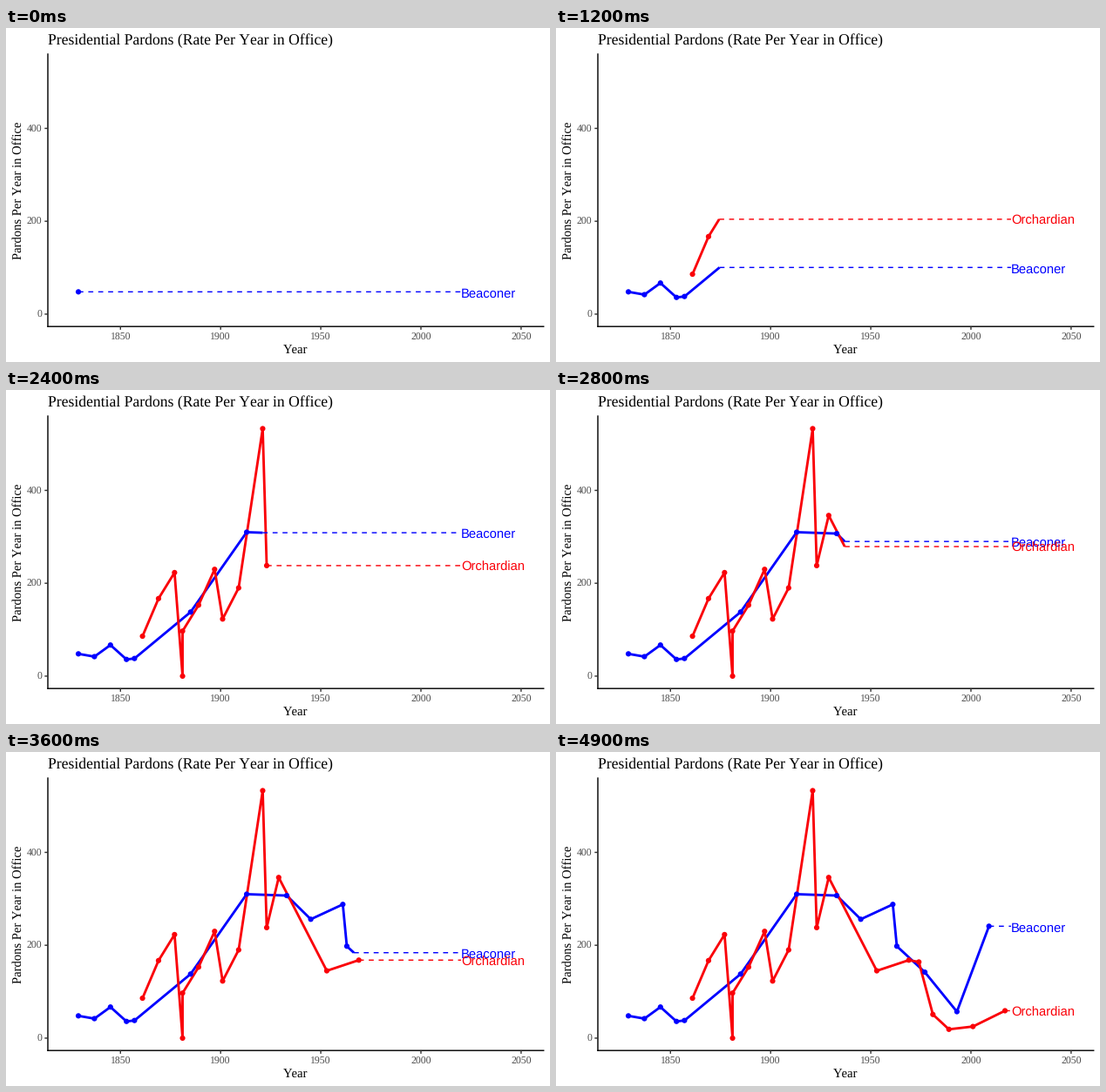
These frames come from a looping animation (624x384 px, 5000 ms). A matplotlib script:

```python
import matplotlib.pyplot as plt
import numpy as np
from matplotlib.animation import FuncAnimation
from matplotlib.lines import Line2D

W, H, DPI = 624, 384, 96
FRAMES, INTERVAL = 50, 100
PT = 72 / DPI  # points per pixel
MM = 72.27 / 25.4 * PT  # stroke width unit, in points
LEFT, RIGHT, TOP, BOTTOM = 48, 616.7, 30, 343.2
X_LIM, Y_LIM = (1813.75, 2061.25), (-26.67, 560)
UNITS_PER_PX = (Y_LIM[1] - Y_LIM[0]) / (BOTTOM - TOP)
FIRST_YEAR, LAST_YEAR, LABEL_YEAR = 1829, 2017, 2020
SERIF, SANS = "Liberation Serif", "Liberation Sans"

plt.rcParams.update({"text.hinting": "none", "text.kerning_factor": 6})

fig = plt.figure(figsize=(W / DPI, H / DPI), dpi=DPI, facecolor="white")
ax = fig.add_axes([LEFT / W, 1 - BOTTOM / H, (RIGHT - LEFT) / W, (BOTTOM - TOP) / H])
ax.set(xlim=X_LIM, ylim=Y_LIM, xticks=[], yticks=[])
ax.spines[["top", "right"]].set_visible(False)
for side in ("left", "bottom"):
    ax.spines[side].set(linewidth=MM / 2, color="black", snap=False)


def caption(x, y, text, size, color="black", **kw):
    """Serif text with its baseline at a pixel position measured from the top left."""
    fig.text(x / W, 1 - y / H, text, fontsize=size * PT, family=SERIF, color=color,
             va="baseline", rotation_mode="anchor", **kw)


def tick(x, y, dx, dy):
    fig.add_artist(Line2D([x / W, (x + dx) / W], [1 - y / H, 1 - (y + dy) / H],
                          lw=MM / 2, color="#333333", solid_capstyle="butt", snap=False))


caption(LEFT, 19, "Presidential Pardons (Rate Per Year in Office)", 17.6)
caption((LEFT + RIGHT) / 2, 374, "Year", 14.67, ha="center")
caption(18, (TOP + BOTTOM) / 2, "Pardons Per Year in Office", 14.67, ha="center", rotation=90)
for year in range(1850, 2051, 50):
    x = LEFT + (year - X_LIM[0]) / (X_LIM[1] - X_LIM[0]) * (RIGHT - LEFT)
    tick(x, BOTTOM, 0, 3.67)
    caption(x, 359, str(year), 11.73, "#4d4d4d", ha="center")
for rate in range(0, 401, 200):
    y = BOTTOM - (rate - Y_LIM[0]) / UNITS_PER_PX
    tick(LEFT, y, -3.67, 0)
    caption(41.4, y + 4, str(rate), 11.73, "#4d4d4d", ha="right")


class Series:
    def __init__(self, name, color, years, rates, z):
        self.data = np.column_stack([years, rates]).astype(float)
        progress = (years - FIRST_YEAR) / (LAST_YEAR - FIRST_YEAR)
        self.steps = np.round(progress * (FRAMES - 1))
        self.line, = ax.plot([], [], color=color, lw=MM, solid_capstyle="butt",
                             solid_joinstyle="round", zorder=3 + z)
        self.lead, = ax.plot([], [], color=color, lw=MM / 2, ls=(0, (4, 4)),
                             snap=False, zorder=4 + z)
        # A scatter without edges keeps sub-pixel positions
        self.dots = ax.scatter([], [], s=(6.2 * PT) ** 2, facecolor=color,
                               edgecolor="none", zorder=5 + z)
        self.label = ax.text(LABEL_YEAR, 0, name, color=color, family=SANS,
                             fontsize=14.7 * PT, va="baseline", zorder=6 + z)

    def draw(self, step):
        count = np.searchsorted(self.steps, step, side="right")
        path = reached = self.data[:count]
        if 0 < count < len(self.data):
            start, end = self.steps[count - 1:count + 1]
            t = (step - start) / (end - start)
            head = (1 - t) * self.data[count - 1] + t * self.data[count]
            path = np.vstack([reached, head])
        self.line.set_data(path[:, 0], path[:, 1])
        self.dots.set_offsets(reached)
        for part in (self.lead, self.label):
            part.set_visible(count > 0)
        if count:
            x, y = path[-1]
            self.lead.set_data([x, LABEL_YEAR], [y, y])
            self.label.set_y(y - 6.1 * UNITS_PER_PX)


# Most terms follow each other at a regular step of years
series = [
    Series("Beaconer", "#0000ff",
           np.r_[1829:1854:8, 1857:1914:28, 1933, 1945, 1961, 1963, 1977:2010:16],
           [48, 42, 67, 36, 38, 138, 310, 307, 256, 288, 198, 142, 57, 241], 0),
    Series("Orchardian", "#fa0008",
           np.r_[1861:1878:8, 1881, 1881:1898:8, 1901:1910:8, 1921, 1923, 1929,
                 1953:1970:16, 1974, 1981:1990:8, 2001:2018:16],
           [86, 167, 223, 0, 97, 153, 230, 123, 190, 533,
            238, 346, 145, 168, 164, 51, 19, 25, 59], 0.5),
]


def draw(step):
    for s in series:
        s.draw(step)


anim = FuncAnimation(fig, draw, frames=FRAMES, interval=INTERVAL, repeat=True,
                     repeat_delay=0, init_func=lambda: draw(0))
plt.show()
```
